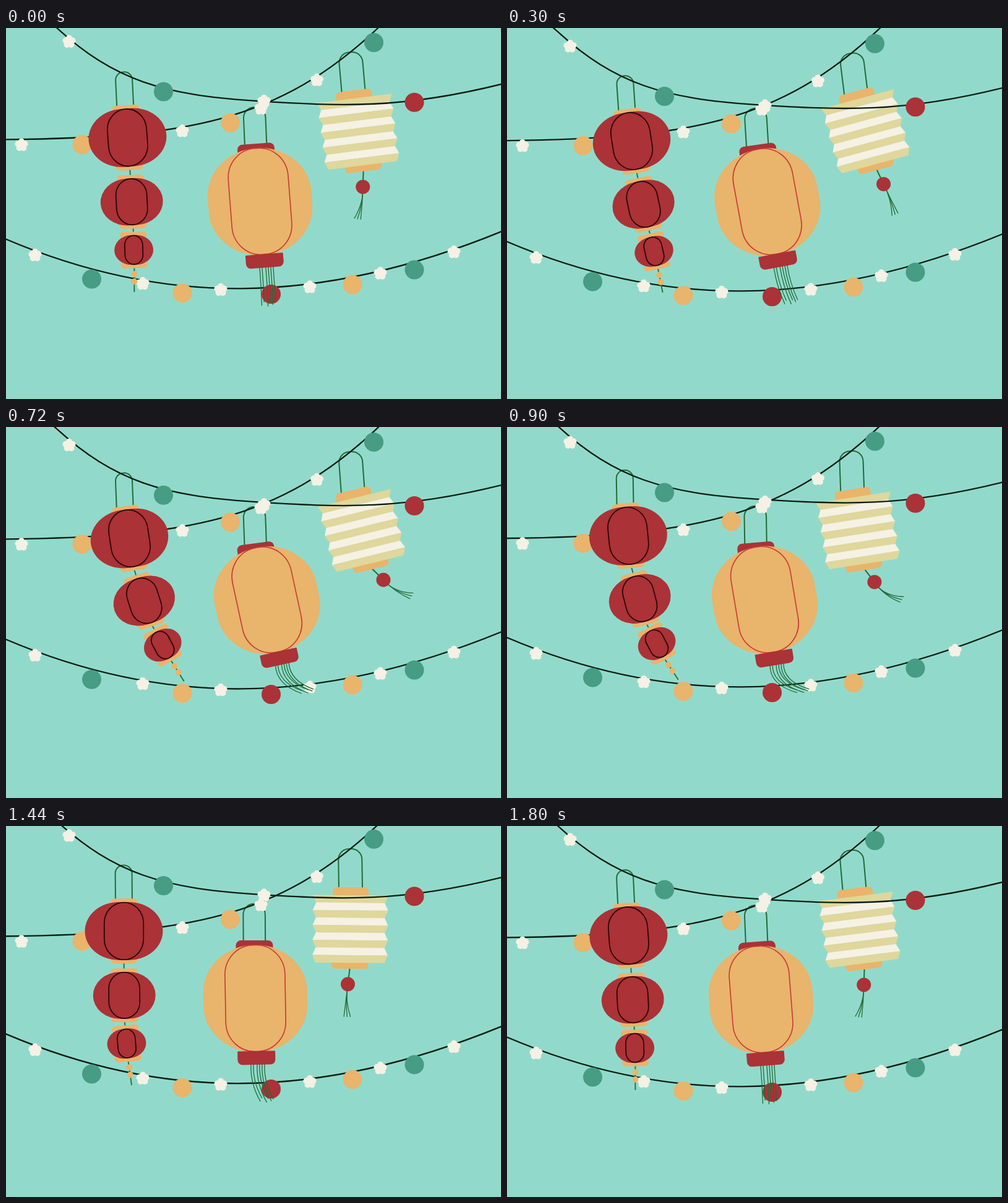
Write an HTML page with a canvas that moves like this. It is 800 by 600 pixels and loops after 1.83 s.

```html
<!DOCTYPE html>
<html>
<head>
<meta charset="utf-8">
<title>Lanterns</title>
<style>
html, body { margin: 0; width: 100%; height: 100%; overflow: hidden; background: #91dacb; }
canvas { display: block; }
</style>
</head>
<body>
<canvas id="stage" width="800" height="600"></canvas>
<script>
const ctx = document.getElementById('stage').getContext('2d');
const SKY = '#91dacb', RED = '#ab3236', ORANGE = '#e9b46b', TEAL = '#479c84',
  CREAM = '#f5f1e4', KHAKI = '#dfd79b', GREEN = '#226b38', INK = '#0b1c10', DARK = '#2a0609';
const RAD = Math.PI / 180;
let phase = 0;

// Sine wave delayed by lag degrees
const wave = lag => Math.sin(phase - lag * RAD);
// Angle from straight down, positive to the right
const swing = (mid, amp, lag) => (mid + amp * wave(lag)) * RAD;
const step = ([x, y], a, len) => [x + Math.sin(a) * len, y + Math.cos(a) * len];

function fill(color) { ctx.fillStyle = color; ctx.fill(); }
function stroke(color, width) { ctx.strokeStyle = color; ctx.lineWidth = width; ctx.stroke(); }

function at([x, y], a, draw) {
  ctx.save();
  ctx.translate(x, y);
  ctx.rotate(-a);
  draw();
  ctx.restore();
}

function box(x, y, w, h, r) {
  ctx.beginPath();
  ctx.roundRect(x, y, w, h, r);
}

function disc([x, y], r, color) {
  ctx.beginPath();
  ctx.arc(x, y, r, 0, 7);
  fill(color);
}

function line(a, b, width) {
  ctx.beginPath();
  ctx.moveTo(...a);
  ctx.lineTo(...b);
  stroke(GREEN, width);
}

// Thread that leaves along startAngle and bends towards endAngle
function strand(p, startAngle, endAngle, len) {
  const bend = startAngle - .3 * (endAngle - startAngle);
  ctx.beginPath();
  ctx.moveTo(...p);
  ctx.quadraticCurveTo(...step(p, bend, len * .5), ...step(p, endAngle, len));
  stroke(GREEN, 1.3);
}

function flower(x, y) {
  for (let i = 0; i < 5; i++) disc(step([x, y], Math.PI + i * 72 * RAD, 5.7), 5.1, CREAM);
  disc([x, y], 5, CREAM);
}

function garland(path, dy, beadDy, balls, flowers) {
  ctx.save();
  ctx.translate(0, dy);
  ctx.strokeStyle = INK;
  ctx.lineWidth = 2.3;
  ctx.stroke(new Path2D(path));
  ctx.restore();
  for (const [x, y, color] of balls) disc([x, y + beadDy], 15.5, color);
  for (const [x, y] of flowers) flower(x, y + beadDy);
}

function handle(hook, a, w, len, r) {
  at(hook, a, () => { box(-w / 2, 0, w, len, [r, r, 0, 0]); stroke(GREEN, 2); });
  return step(hook, a, len);
}

function redGlobe(center, a, rx, ry, inner) {
  at(center, a, () => {
    box(-22, -ry - 5.5, 44, 8, [6, 6, 0, 0]); fill(ORANGE);
    box(-22, ry - 2.5, 44, 8, [0, 0, 6, 6]); fill(ORANGE);
    box(-rx, -ry, rx * 2, ry * 2, { x: rx * .87, y: ry }); fill(RED);
    box(-inner, -ry + .7, inner * 2, ry * 2 - 1.4, { x: inner, y: inner * 1.06 });
    stroke(DARK, 1.8);
  });
}

function redLantern(dy) {
  const a1 = swing(5, 5, 8), a2 = swing(9, 9, 40), a3 = swing(14.5, 14, 66), a4 = swing(16.5, 17, 78);
  const cap = handle([190, 70.5 + dy], swing(1.9, 2, -25), 27, 57.3, 13);
  const c1 = step(cap, a1, 49), end1 = step(c1, a1, 50);
  const c2 = step(end1, a2, 54), end2 = step(c2, a2, 41);
  const c3 = step(end2, a3, 37), end3 = step(c3, a3, 28);
  line(end1, c2, 1.8);
  line(end2, c3, 1.8);
  line(end3, step(end3, a4, 40), 1.8);
  redGlobe(c1, a1, 63, 47, 31.7);
  redGlobe(c2, a2, 50.5, 38, 25);
  redGlobe(c3, a3, 31.5, 24, 14.5);
  for (const d of [11, 23]) disc(step(end3, a4, d), 5, ORANGE);
}

function orangeLantern(dy) {
  const a = swing(7, 6, 25), tail = swing(24, 21, 80);
  const cap = handle([401, 128 + dy], swing(1.7, 1.8, -25), 35.5, 66, 17);
  const base = step(cap, a, 193);
  at(cap, swing(4.5, 4.5, 5), () => { box(-30, -7, 60, 16, [8, 8, 0, 0]); fill(RED); });
  at(cap, a, () => {
    box(-84, 0, 168, 174, { x: 84, y: 76 }); fill(ORANGE);
    box(-48.5, .5, 97, 172, { x: 46, y: 48 }); stroke('#c43a36', 1.6);
  });
  [-9, -5, 1, 5, 9, 13].forEach((d, i) =>
    strand(step(base, a + Math.PI / 2, d), a, tail, [62, 57, 64, 58, 62, 59][i]));
  at(cap, a, () => { box(-30.5, 172, 61, 22, [1, 1, 8, 8]); fill(RED); });
}

function creamLantern(dy) {
  const a = swing(8, 8.8, 5), knot = swing(18, 28, 45), tail = swing(24, 37, 65);
  const cap = handle([556, 39 + dy], swing(3.5, 3.6, -25), 38, 67, 17);
  const base = step(cap, a, 125), bead = step(base, knot, 27);
  line(base, bead, 2);
  for (const d of [-.1, 0, .1]) strand(bead, knot, tail + d, 53);
  disc(bead, 11.5, RED);
  at(cap, a, () => {
    box(-29, -5, 58, 14, [6, 6, 0, 0]); fill(ORANGE);
    box(-29.5, 114, 59, 13, [0, 0, 6, 6]); fill(ORANGE);
    const h = 12.1;
    for (let i = 0; i < 9; i++) {
      const top = i % 2 ? 55.5 : 61, low = 116.5 - top, y = 8 + i * h;
      ctx.beginPath();
      ctx.moveTo(-top, y);
      ctx.lineTo(top, y);
      ctx.lineTo(low, y + h + .3);
      ctx.lineTo(-low, y + h + .3);
      fill(i % 2 ? CREAM : KHAKI);
    }
  });
}

function draw() {
  ctx.fillStyle = SKY;
  ctx.fillRect(0, 0, 800, 600);
  const bob = wave(-5), low = 5 * bob, mid = 2.1 * bob, high = 7.5 * bob;
  garland('M-20 332L0 341C250 447.5 500 451.5 800 329L820 320.5', low, low,
    [[138.5, 405.6, TEAL], [285, 428, ORANGE], [428.5, 430, RED], [560, 414.5, ORANGE], [660, 390.5, TEAL]],
    [[47, 367], [221, 413], [347, 423], [491, 418.5], [605, 396.5], [724, 362]]);
  orangeLantern(mid);
  creamLantern(mid);
  garland('M-10 180.3L0 180.2C290 177 440 152 601 0L620 -18', mid, mid,
    [[123, 188.3, ORANGE], [362.5, 153, ORANGE], [594.5, 23.3, TEAL]],
    [[25, 189], [285, 166.7], [412, 130], [502.5, 84.2]]);
  redLantern(high);
  garland('M60 -20L83 0C175 84 255 107.5 400 117S640 130 800 90.3L820 85.5', high, 8 * wave(11),
    [[254.5, 104.5, TEAL], [660, 121.7, RED]],
    [[102, 23.7], [417, 120]]);
}

function tick() {
  // 30 ms steps; one swing takes 1800 ms, then the rest pose is held for one step
  const t = Math.floor(performance.now() % 1830 / 30) * 30;
  phase = t / 1800 * Math.PI * 2;
  draw();
  requestAnimationFrame(tick);
}
tick();
</script>
</body>
</html>
```
